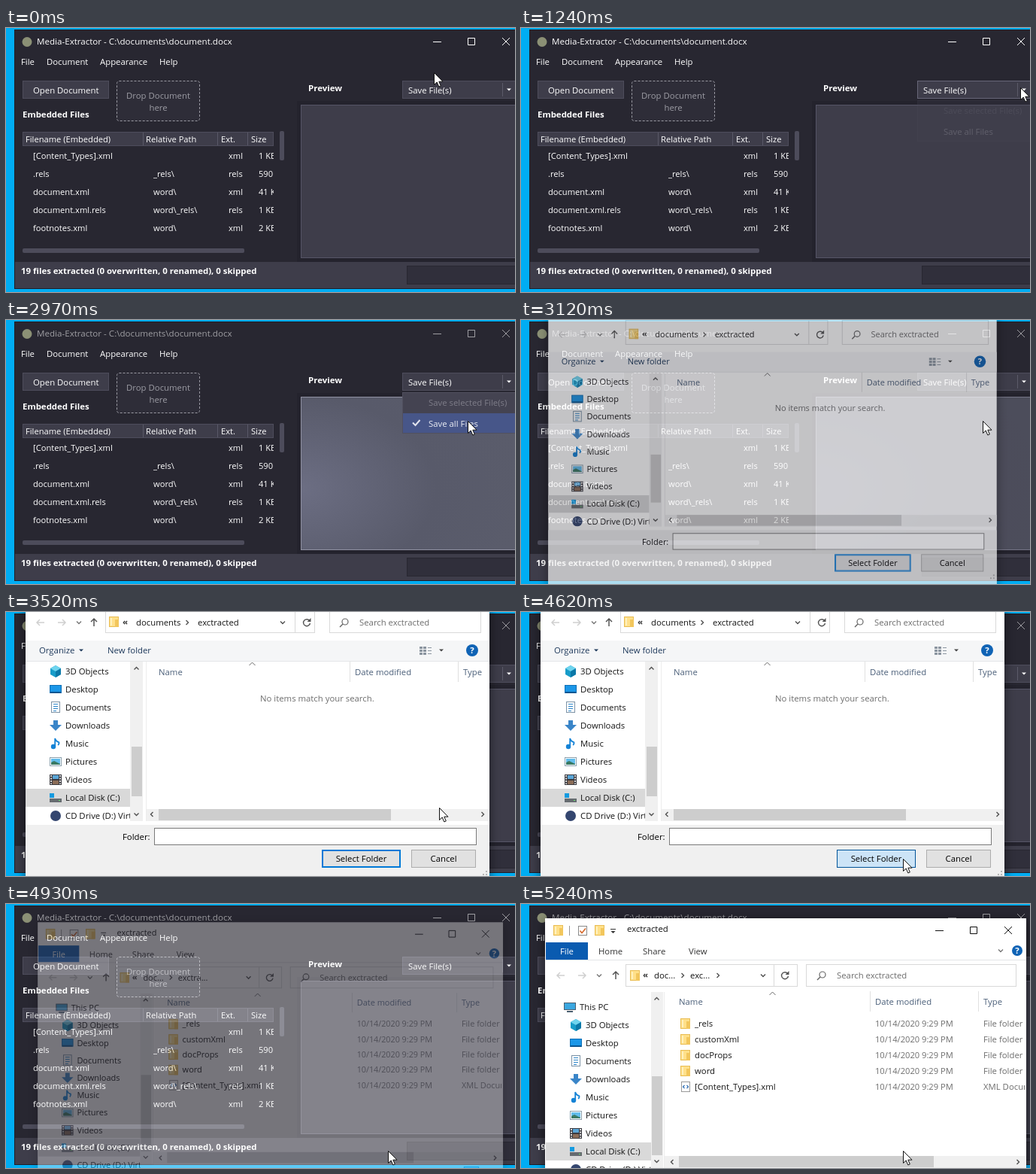
An HTML page that plays this animation: 677x351 px, repeating every 6.34 s.

```html
<!DOCTYPE html>
<html lang="en">
<head>
<meta charset="utf-8">
<title>Saving extracted files</title>
<style>
  html, body { margin: 0; width: 100%; height: 100%; overflow: hidden; background: #00adf3; }
  #stage { display: block; width: 677px; height: 351px; }
  text { font: 11.35px "Open Sans", "Noto Sans", sans-serif; white-space: pre; }
  .title { font-size: 11.6px; }
  .cell { font-size: 11.15px; }
  .bold { font-size: 11.45px; font-weight: 700; }
  .mid { text-anchor: middle; }
  .shadow { filter: drop-shadow(0 3px 7px rgba(0, 0, 0, .55)); }
</style>
</head>
<body>
<svg id="stage" viewBox="0 0 677 351"></svg>
<script>
const LOOP = 6340;

// ---- drawing helpers ----
const rect = (x, y, w, h, fill, line, more = '') => line
  ? `<rect x="${x + .5}" y="${y + .5}" width="${w - 1}" height="${h - 1}" fill="${fill}" stroke="${line}" ${more}/>`
  : `<rect x="${x}" y="${y}" width="${w}" height="${h}" fill="${fill}" ${more}/>`;
const path = (d, line, width = 1, more = '') =>
  `<path d="${d}" fill="none" stroke="${line}" stroke-width="${width}" ${more}/>`;
const shape = (d, fill) => `<path d="${d}" fill="${fill}"/>`;
const disc = (x, y, r, fill) => `<circle cx="${x}" cy="${y}" r="${r}" fill="${fill}"/>`;
const text = (x, midY, str, fill, cls = '') =>
  `<text x="${x}" y="${midY + 4}" fill="${fill}" class="${cls}">${str}</text>`;
const group = (id, inner, more = '') => `<g id="${id}" ${more}>${inner}</g>`;
const clip = (x, y, w, h, inner) =>
  `<svg x="${x}" y="${y}" width="${w}" height="${h}" viewBox="${x} ${y} ${w} ${h}">${inner}</svg>`;
const turn = (x, y, angle) => `transform="translate(${x} ${y}) rotate(${angle})"`;
// angle 0 points down
const chevron = (x, y, angle, line = '#505050', r = 3, width = 1.4) =>
  path(`M${-r} ${-r / 2}L0 ${r / 2}L${r} ${-r / 2}`, line, width, turn(x, y, angle));
const caretDown = (x, y, fill, r = 3) => shape(`M${x - r} ${y - r / 2}h${2 * r}l${-r} ${r}z`, fill);
// angle 0 points up
const arrow = (x, y, angle, line) => path('M0 -5V5M-4 -1L0 -5L4 -1', line, 1.5, turn(x, y, angle));
const windowButtons = (x, y, gap, line) =>
  path(`M${x} ${y + .5}h11M${x + gap + .5} ${y - 4.5}h9v9h-9zM${x + 2 * gap} ${y - 5}l10 10m0 -10l-10 10`, line);
const folder = (x, y) =>
  rect(x, y - 7, 13, 14, '#ffe08a', '#e9bd55') + rect(x + 8, y - 3, 5, 10, '#f2c65c') + rect(x + 2, y - 5, 2, 10, '#fff0bd');
const help = (x, y, r) => disc(x, y, r, '#0f63b5') + text(x, y, '?', '#fff', 'mid bold');
const magnifier = (x, y) =>
  `<circle cx="${x + 1}" cy="${y - 1}" r="4" fill="none" stroke="#666" stroke-width="1.2"/>` +
  path(`M${x - 2} ${y + 2}l-4 4`, '#666', 1.5);
const refresh = (x, y) => path(`M${x + 4} ${y - 2}A4.5 4.5 0 1 0 ${x + 4.5} ${y + 1}`, '#555', 1.4) +
  shape(`M${x + 5.5} ${y - 6}v5h-5z`, '#555');

// ---- application window ----
const LIGHT = '#fff', PANEL = '#3e3d4a', EDGE = '#4e4d5c', BACK = '#282731';

const files = [
  ['[Content_Types].xml', '', 'xml', '1 KB'],
  ['.rels', '_rels\\', 'rels', '590 B'],
  ['document.xml', 'word\\', 'xml', '41 KB'],
  ['document.xml.rels', 'word\\_rels\\', 'rels', '1 KB'],
  ['footnotes.xml', 'word\\', 'xml', '2 KB']
];
const fileRows = files.map(([name, dir, ext, size], i) => {
  const y = 170 + 24 * i;
  return text(36, y, name, LIGHT, 'cell') + text(196, y, dir, LIGHT, 'cell') +
    text(296, y, ext, LIGHT, 'cell') + text(336, y, size, LIGHT, 'cell');
}).join('');
const header = rect(22, 138, 334, 19, PANEL, EDGE) + path('M182.5 139v17M281.5 139v17M321.5 139v17', '#5a5968') +
  [[26, 'Filename (Embedded)'], [186, 'Relative Path'], [286, 'Ext.'], [326, 'Size']]
    .map(([x, s]) => text(x, 148, s, LIGHT, 'cell')).join('');

const app = rect(11, 2, 680, 345, BACK, '#1f1e28') +
  rect(387, 97, 290, 214, '#24232d') + rect(12, 311, 665, 35, PANEL) +
  disc(28, 18.5, 6.5, '#8b9075') +
  group('caption', text(41, 18, 'Media-Extractor - C:\\documents\\document.docx', LIGHT, 'title') +
    windowButtons(568, 18, 46, LIGHT)) +
  [[20, 'File'], [54, 'Document'], [125, 'Appearance'], [204, 'Help']]
    .map(([x, s]) => text(x, 45, s, LIGHT)).join('') +
  rect(22, 70, 115, 24, PANEL, EDGE) + text(36, 83, 'Open Document', LIGHT) +
  rect(147, 70, 111, 54, '#2e2d38', '#9a9aa3', 'rx="3" stroke-dasharray="3 2"') +
  text(202.5, 90, 'Drop Document', '#9c9ca4', 'mid') + text(202.5, 106, 'here', '#9c9ca4', 'mid') +
  text(22, 115, 'Embedded Files', LIGHT, 'bold') +
  clip(22, 138, 334, 150, header + fileRows) +
  rect(364, 137, 6, 39, '#4d4c5b', '', 'rx="2"') + rect(22, 293, 295, 6, '#4d4c5b', '', 'rx="2"') +
  text(402, 79.5, 'Preview', LIGHT, 'bold') +
  rect(392, 102, 300, 204, PANEL, '#565566') +
  group('glow', rect(392, 102, 300, 204, 'url(#sheen)', '#9091a2')) +
  rect(527, 70, 160, 24, PANEL, EDGE) +
  group('hover', rect(527, 70, 160, 24, 'none', '#676678')) +
  path('M660.5 73v18', '#5b5a69') + text(535, 83, 'Save File(s)', LIGHT) + caretDown(669, 82, LIGHT) +
  text(20, 323, '19 files extracted (0 overwritten, 0 renamed), 0 skipped', LIGHT, 'bold') +
  rect(533, 316, 160, 25, '#302f3b', '#282731');

const menu = rect(527, 96, 160, 55, '#444351', '#51505f') +
  text(562, 110, 'Save selected File(s)', '#7e7d89') + text(562, 138, 'Save all Files', '#d8d8de') +
  group('pick', rect(528, 124, 160, 26, '#475689') + path('M541 136.5l3.5 3.5l6 -7', '#e2e4ee', 2) +
    text(562, 138, 'Save all Files', '#eceef4'));

// ---- folder tree shared by both file windows ----
const icons = {
  'This PC': (x, y) => rect(x, y - 6, 16, 10, '#3ba7e0', '#4b5f70') + rect(x + 4, y + 5, 8, 2, '#4b5f70'),
  '3D Objects': (x, y) => shape(`M${x + 1} ${y - 4}l7 -4l7 4v8l-7 4l-7 -4z`, '#179cc9') +
    shape(`M${x + 1} ${y - 4}l7 -4l7 4l-7 4z`, '#6fd4ee') + shape(`M${x + 8} ${y}l7 -4v8l-7 4z`, '#0b78a8'),
  'Desktop': (x, y) => rect(x, y - 6, 16, 11, '#1b97e8', '#0e6fb5') + rect(x + 1, y + 3, 14, 2, '#0b5590'),
  'Documents': (x, y) => rect(x + 2, y - 8, 12, 15, '#fff', '#7d93a6') +
    path(`M${x + 5} ${y - 4.5}h6M${x + 5} ${y - 1.5}h6M${x + 5} ${y + 1.5}h6M${x + 5} ${y + 4.5}h4`, '#2b84c8'),
  'Downloads': (x, y) => shape(`M${x + 5} ${y - 7}h6v6h5l-8 8l-8 -8h5z`, '#3a85c8'),
  'Music': (x, y) => disc(x + 5, y + 4, 3.2, '#1583d6') + path(`M${x + 7.2} ${y + 4}v-11q1 4 5 5q1 2 -1 4`, '#1583d6', 1.8),
  'Pictures': (x, y) => rect(x, y - 6, 16, 12, '#fff', '#8ba0ad') + rect(x + 2, y - 4, 12, 8, '#62bdec') +
    shape(`M${x + 2} ${y + 4}v-3l4 -2l8 4v1z`, '#3a7a64'),
  'Videos': (x, y) => rect(x, y - 7, 16, 14, '#3a3a40') + rect(x + 4, y - 6, 8, 5, '#5aa5d6') + rect(x + 4, y + 1, 8, 5, '#8b6d58') +
    path(`M${x + 2} ${y - 6}v12M${x + 14} ${y - 6}v12`, '#ddd', 2, 'stroke-dasharray="2 1.5"'),
  'Local Disk (C:)': (x, y) => rect(x, y + 1, 16, 5, '#666b70') + rect(x + 12, y + 3, 2, 1, '#67e06a') + rect(x, y - 6, 6, 6, '#159be0'),
  'CD Drive (D:) Virtual': (x, y) => disc(x + 8, y, 7, '#34466f')
};
const tree = (names, x, y, indent) => names.map((name, i) => {
  const dx = i ? indent : 0, mid = y + 24 * i;
  return (name.startsWith('Local') ? rect(0, mid - 12, 300, 24, '#d9d9d9') : '') +
    icons[name](x + dx, mid) + text(x + dx + 21, mid, name, '#151515');
}).join('');
const names = Object.keys(icons);

const columns = (x, y, top) => text(x, y, 'Name', '#4c607a') + text(x + 261, y, 'Date modified', '#4c607a') +
  text(x + 405, y, 'Type', '#4c607a') + chevron(x + 124.5, top, 180, '#666', 4, 1) +
  path(`M${x + 254.5} ${top - 3}v27M${x + 398.5} ${top - 3}v27`, '#e0e0e0');

// ---- folder picker ----
const button = (x, w, label, fill, line) =>
  rect(x, 316, w, 24, fill, line) + text(x + w / 2, 328, label, '#000', 'mid');
const grip = [[640, 344], [636, 348], [640, 348]].map(([x, y]) => rect(x - 2, y, 2, 2, '#b5b5b5')).join('');

const picker = rect(26, -20, 617, 390, '#fff') +
  arrow(46, 14, -90, '#d0d0d0') + arrow(74, 14, 90, '#d0d0d0') + chevron(97, 14, 0, '#777') + arrow(117, 14, 0, '#555') +
  rect(132, -6, 279, 34, '#fff', '#d9d9d9') + path('M384.5 -5v32', '#d9d9d9') +
  folder(137, 13) + text(155, 13, '«', '#333', 'bold') + text(173, 14, 'documents', '#151515') + chevron(241, 14, -90) +
  text(255, 14, 'exctracted', '#151515') + chevron(368, 14, 0) + refresh(400, 14) +
  rect(430, -6, 202, 34, '#fff', '#d9d9d9') + magnifier(450, 14) + text(470, 14, 'Search exctracted', '#6d6d6d') +
  rect(26, 38, 617, 27, '#f5f6f7') + path('M26 65.5h617', '#e4e6e8') +
  text(44, 51, 'Organize', '#1e395b') + caretDown(100, 51, '#1e395b') + text(135, 51, 'New folder', '#1e395b') +
  [46, 50, 54].map(y => rect(550, y, 4, 3, '#8b95a0') + rect(555, y, 4, 3, '#8b95a0') + rect(561, y + 1, 5, 1, '#8b95a0')).join('') +
  caretDown(579, 51, '#444') + help(620, 51, 8) +
  clip(26, 66, 139, 212, tree(names.slice(1), 58, 79, 0)) +
  rect(165, 66, 17, 212, '#f0f0f0') + rect(167, 179, 14, 66, '#cdcdcd') +
  chevron(173.5, 75, 180) + chevron(173.5, 269, 0) + path('M186.5 66v212', '#ececec') +
  columns(203, 80, 69) + text(338, 115, 'No items match your search.', '#6d6d6d') +
  rect(187, 262, 456, 16, '#f0f0f0') + rect(203, 262, 309, 15, '#cdcdcd') +
  chevron(194, 269, 90) + chevron(634, 269, -90) +
  rect(26, 283, 617, 90, '#f0f0f0') + text(155, 299, 'Folder:', '#000') +
  rect(197, 287, 429, 23, '#fff', '#7a7a7a') + group('caret', rect(203, 291, 1, 15, '#000')) +
  button(420, 105, 'Select Folder', '#e1e1e1', '#0078d7') + rect(421, 317, 103, 22, 'none', '#0078d7') +
  group('over', button(420, 105, 'Select Folder', '#e5f1fb', '#0078d7')) +
  group('press', button(420, 105, 'Select Folder', '#cce4f7', '#005499')) +
  button(539, 86, 'Cancel', '#e1e1e1', '#adadad') + grip;

// ---- file browser ----
const listing = ['_rels', 'customXml', 'docProps', 'word', '[Content_Types].xml'].map((name, i) => {
  const y = 159 + 21 * i, file = i === 4;
  const icon = file
    ? rect(213, y - 7, 12, 14, '#fff', '#9a9a9a') + path(`M217.5 ${y - 2}l-2 2l2 2M220.5 ${y - 2}l2 2l-2 2`, '#2c6db5', 1.2)
    : folder(212, y);
  return icon + text(231, y, name, '#151515') + text(471, y, '10/14/2020 9:29 PM', '#6d6d6d', 'cell') +
    text(615, y, file ? 'XML Document' : 'File folder', '#6d6d6d');
}).join('');

const browser = rect(32, 19, 640, 353, '#fff') +
  folder(43, 35) + path('M64.5 29v13', '#999') + rect(76, 29, 12, 13, '#fff', '#8a8a8a') +
  path('M78.5 35.5l2.5 3l5 -6', '#d5682b', 1.6) + folder(98, 35) +
  path('M119 33.5h7', '#333') + caretDown(122.5, 37.5, '#333') + text(141, 33, 'exctracted', '#111') +
  windowButtons(551, 35, 46, '#111') +
  rect(33, 51, 56, 23, '#0a5bb0') + text(52, 63, 'File', '#fff') +
  [[103, 'Home'], [162, 'Share'], [223, 'View']].map(([x, s]) => text(x, 63, s, '#333')).join('') +
  chevron(638, 62, 0, '#777') + help(660, 62, 7) + path('M33 74.5h639', '#e3e5e7') +
  arrow(53, 95, -90, '#d0d0d0') + arrow(81, 95, 90, '#d0d0d0') + chevron(104, 95, 0, '#777') + arrow(126, 95, 0, '#555') +
  rect(139, 80, 229, 30, '#fff', '#d9d9d9') + path('M336.5 81v28', '#d9d9d9') +
  folder(145, 95) + text(162, 94, '«', '#333', 'bold') + text(177, 95, 'doc...', '#151515') + chevron(215, 95, -90) +
  group('wide', text(225, 95, 'exctra...', '#151515')) +
  group('narrow', text(225, 95, 'exc...', '#151515') + chevron(262, 95, -90)) +
  chevron(322, 95, 0) + refresh(351, 95) +
  rect(379, 80, 280, 30, '#fff', '#d9d9d9') + magnifier(400, 95) + text(420, 95, 'Search exctracted', '#6d6d6d') +
  clip(33, 117, 140, 240, tree(names, 57, 137, 8)) +
  rect(173, 117, 16, 236, '#f0f0f0') + rect(174, 229, 14, 105, '#cdcdcd') +
  chevron(180.5, 126, 180) + chevron(180.5, 342, 0) + path('M190.5 117v236', '#ececec') +
  clip(191, 112, 479, 223, columns(210, 130, 119) + listing) +
  rect(191, 335, 481, 16, '#f0f0f0') + rect(210, 335, 339, 15, '#cdcdcd') +
  chevron(201, 343, 90) + chevron(661, 343, -90) +
  rect(618, 355, 21, 16, '#cce8ff', '#2a8dd4');

const pointer = '<path d="M.5 .5V16.5L4.2 13L6.8 19L9.3 18L6.8 12.2H12Z" fill="#fff" stroke="#111"/>';

const stage = document.getElementById('stage');
stage.innerHTML = `<defs><radialGradient id="sheen" cx="0" cy=".6" r="1">
  <stop offset="0" stop-color="#6c6e83"/><stop offset=".6" stop-color="#585a6a"/>
  <stop offset="1" stop-color="#5a5c6b"/></radialGradient></defs>` +
  rect(0, 0, 677, 351, '#00adf3') + app + group('menu', menu) +
  group('picker', picker, 'class="shadow"') + group('browser', browser, 'class="shadow"') + group('pointer', pointer);

// ---- motion ----
const el = {};
stage.querySelectorAll('g[id]').forEach(g => el[g.id] = g);

const bursts = [[300, 920, 9], [1000, 1630, 9], [1710, 1710, 1], [1950, 2100, 3], [2420, 3040, 9],
  [3120, 3280, 3], [3440, 4070, 9], [4140, 4140, 1], [4300, 4930, 9], [5010, 5240, 4]];
const ticks = [0, ...bursts.flatMap(([from, to, n]) => Array.from({ length: n },
  (_, i) => Math.ceil((from + (n > 1 ? (to - from) * i / (n - 1) : 0)) / 10) * 10))];
const snap = t => ticks.findLast(k => k <= t);

// Linear track through [time, value] points.
const track = (t, points) => {
  const i = points.findIndex(p => p[0] > t);
  if (i === 0) return points[0][1];
  if (i < 0) return points[points.length - 1][1];
  const [t0, a] = points[i - 1], [t1, b] = points[i];
  return a + (b - a) * (t - t0) / (t1 - t0);
};
const fade = (g, alpha) => {
  g.style.opacity = alpha;
  g.style.display = alpha > 0 ? '' : 'none';
};
const grow = (g, cx, cy, k) =>
  g.setAttribute('transform', `translate(${cx} ${cy}) scale(${k}) translate(${-cx} ${-cy})`);
const between = (t, a, b) => t >= a && t < b ? 1 : 0;

const pathX = [[220, 569], [460, 600], [700, 648], [920, 664], [1320, 664], [1630, 620], [1870, 620], [2100, 614],
  [3360, 614], [3440, 603], [3520, 576], [3600, 556], [3750, 526], [4070, 508]];
const pathY = [[220, 59], [460, 68], [700, 82], [920, 79], [1320, 79], [1630, 113], [1870, 113], [2100, 134],
  [3360, 134], [3440, 186], [3520, 260], [3600, 296], [3750, 320], [4070, 328]];

function draw(time) {
  const t = snap(time);
  el.pointer.setAttribute('transform', `translate(${track(t, pathX)} ${track(t, pathY)})`);
  fade(el.hover, track(t, [[380, 0], [620, 1], [1400, 1], [1630, 0]]));
  fade(el.menu, t < 3040 ? track(t, [[1080, 0], [1240, .22], [1480, 1]]) : 0);
  fade(el.pick, track(t, [[1870, 0], [2100, 1]]));
  fade(el.glow, track(t, [[2350, 0], [2970, 1], [3280, 0]]));
  fade(el.caption, t < 2890 ? 1 : .55);

  fade(el.picker, track(t, [[2970, 0], [3040, .35], [3120, .72], [3200, .93], [3280, 1], [4620, 1], [4700, .6], [4780, .2], [4850, 0]]));
  grow(el.picker, 334, 176, track(t, [[2970, .93], [3040, .95], [3280, 1], [4620, 1], [4850, .93]]));
  fade(el.caret, between(t, 3970, 4540));
  fade(el.over, track(t, [[4070, 0], [4300, 1]]));
  fade(el.press, track(t, [[4300, 0], [4540, 1]]));

  fade(el.browser, track(t, [[4860, 0], [4930, .36], [5010, .72], [5090, .9], [5240, 1]]));
  grow(el.browser, 340, 178, track(t, [[4930, .967], [5010, .985], [5090, .994], [5240, 1]]));
  fade(el.wide, between(t, 0, 5010));
  fade(el.narrow, between(t, 5010, LOOP));
}

const start = performance.now();
(function frame() {
  draw((performance.now() - start) % LOOP);
  requestAnimationFrame(frame);
})();
</script>
</body>
</html>
```
